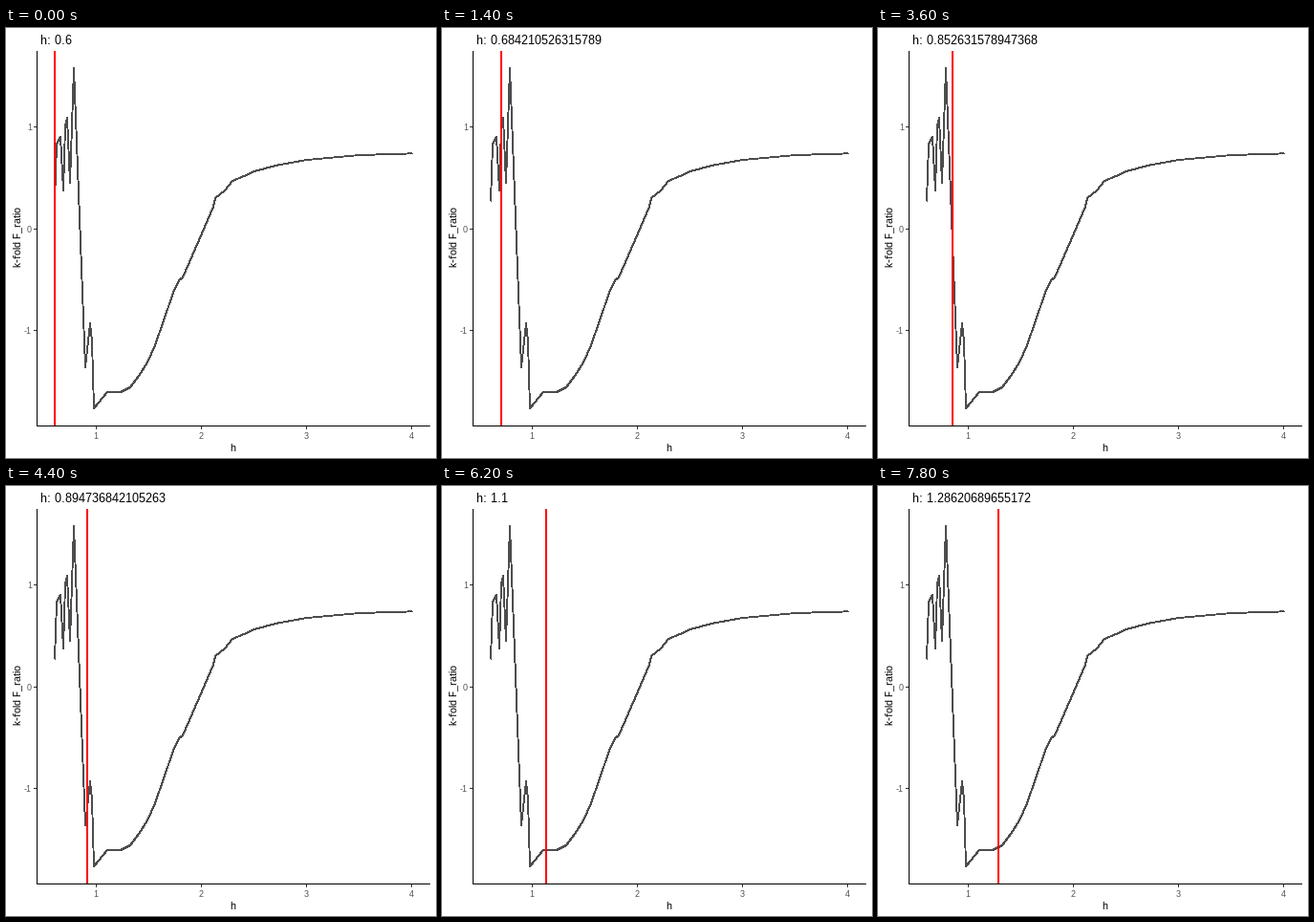
A matplotlib script for the animation above (8 s loop, 450 px wide and 450 px high).

```python
import matplotlib.pyplot as plt
import numpy as np
from matplotlib.animation import FuncAnimation
from matplotlib.patches import Rectangle

plt.rcParams.update({
    "font.family": "Liberation Sans",
    "text.hinting": "native",
    "text.hinting_factor": 1,
})

SIZE = 450
TOP, BOTTOM, LEFT, RIGHT = 24, 416, 32, 444
GREY = "#4d4d4d"

# Bandwidths visited by the marker: a fine grid, then a coarser one.
states = np.concatenate([np.linspace(0.6, 1.0, 20), np.linspace(1.1, 2.0, 30)])


def to_px(h):
    return np.floor(51.05 + 110 * (np.asarray(h) - 0.6))


# At 72 dpi one point is one pixel.
fig = plt.figure(figsize=(SIZE / 72, SIZE / 72), dpi=72, facecolor="white")
ax = fig.add_axes([0, 0, 1, 1])
ax.set_xlim(0, SIZE)
ax.set_ylim(SIZE, 0)
ax.axis("off")


def box(x, y, w, h, color, z=1):
    patch = Rectangle((x, y), w, h, fc=color, lw=0, antialiased=False, zorder=z)
    return ax.add_patch(patch)


def label(x, y, text, size, color="black", **kw):
    return ax.text(x, y, text, fontsize=size, color=color, va="baseline", **kw)


# Axes, ticks and labels
box(LEFT, TOP, 1, BOTTOM - TOP + 1, "black")
box(LEFT, BOTTOM, RIGHT - LEFT, 1, "black")
for n in range(1, 5):
    x = to_px(n) - 1
    box(x, BOTTOM + 1, 1, 3, "#333333")
    label(x, 430, str(n), 9, GREY, ha="center")
for n in range(-1, 2):
    y = int(210 - 106.5 * n)
    box(LEFT - 3, y, 3, 1, "#333333")
    label(27, y + 4, str(n), 9, GREY, ha="right")
label(237, 443, "h", 11, ha="center")
label(15, 219, "k-fold F_ratio", 11, ha="center", rotation=90,
      rotation_mode="anchor")

# Curve: turning points on the fine grid, a few bends, an exponential tail
turns = {0: 181, 1: 122, 3: 114, 4: 170, 5: 103, 6: 94, 7: 162, 9: 42,
         14: 355, 16: 309, 17: 328, 18: 398}
head = [(to_px(states[i]), y) for i, y in turns.items()]
bends = [(106, 381), (120, 381), (130, 376), (139, 364), (148, 350),
         (156, 332), (165, 306), (175, 277), (181, 264), (185, 261),
         (205, 215), (217, 187), (219, 178), (229, 170), (237, 160)]
tail_x = to_px(np.linspace(2.4, 4, 17))
tail_y = np.round(130 + 30 * np.exp((237 - tail_x) / 60))
curve = np.array(head + bends + list(zip(tail_x, tail_y)))
# Without antialiasing every touched pixel is filled, so this is two pixels wide.
ax.plot(curve[:, 0], curve[:, 1], color=GREY, lw=0.9, antialiased=False,
        solid_joinstyle="round", solid_capstyle="butt", zorder=2)

marker = box(50, TOP, 2, BOTTOM - TOP, "#ff0000", z=3)
title = label(36, 17, "", 13, ha="left")


def update(tick):
    # Two steps per 300 ms: the marker moves on one, the title follows.
    step = (tick + 1) // 3 + tick // 3
    marker.set_x(to_px(states[(step + 1) // 2]) - 1)
    title.set_text(f"h: {states[step // 2]:.15g}")
    return marker, title


anim = FuncAnimation(fig, update, frames=80, interval=100, repeat=True,
                     repeat_delay=0, init_func=lambda: update(0))
plt.show()
```
